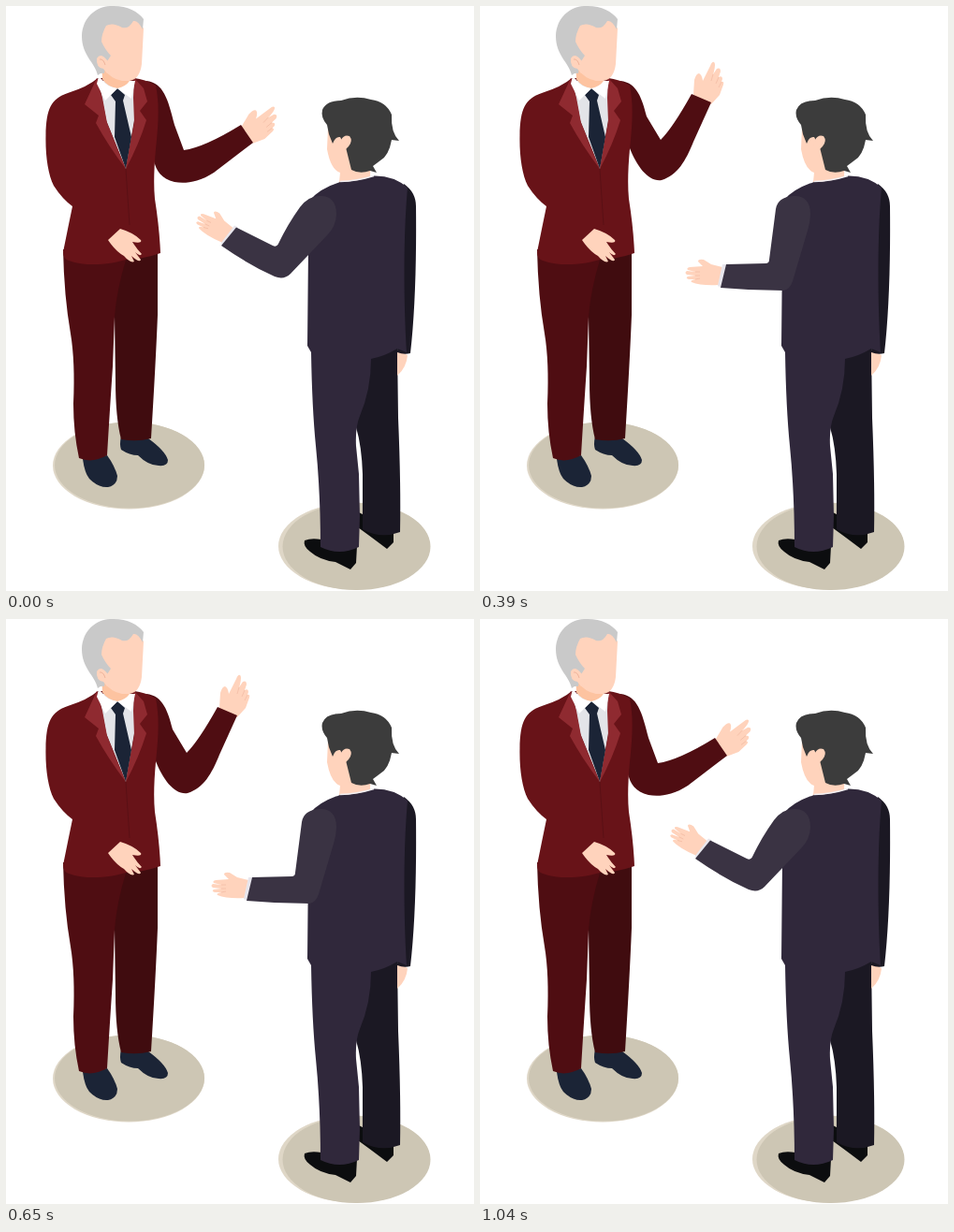
Recreate the animation shown at these times as an HTML page. Size 500x625 px, loop 1170 ms.

```html
<!DOCTYPE html>
<html lang="en">
<head>
<meta charset="utf-8">
<title>Conversation</title>
<style>
  html, body { margin: 0; width: 100%; height: 100%; overflow: hidden; background: #fff; }
  svg { display: block; width: 100%; height: 100%; }
  .skin { fill: #ffd3bc; }
  .crease { fill: none; stroke: #f3bda6; stroke-width: .8; }
  .navy { fill: #1b2436; }
  .red { fill: #681318; }
  .dark-red { fill: #4f0d12; }
  .lapel { fill: #8f2a30; }
  .suit { fill: #30283b; }
  .shade { fill: #1b1823; }
  .black { fill: #0c0d0f; }
</style>
</head>
<body>
<svg viewBox="0 0 500 625">
  <!-- floor discs -->
  <ellipse cx="131" cy="491" rx="81" ry="46.5" fill="#dfd7c7"/>
  <ellipse cx="132" cy="490.5" rx="80" ry="46" fill="#cdc6b4"/>
  <ellipse cx="372" cy="577" rx="81" ry="46.5" fill="#dfd7c7"/>
  <ellipse cx="374.5" cy="577.5" rx="79" ry="46.5" fill="#cdc6b4"/>

  <!-- man in red -->
  <g>
    <path class="navy" d="M123 460Q121 468 123 474Q132 480 141 480Q152 491 163 491Q173 492 173 485Q170 475 152 462Z"/>
    <path class="navy" d="M82 484Q84 499 89 505Q99 515 109 514Q119 512 119 502Q116 491 108 480Z"/>
    <path fill="#400c0f" d="M112 268L116 332L117 400Q117 440 123 463Q140 466 155 462Q160 380 162 330V262Z"/>
    <path class="dark-red" d="M61 260Q62 310 69 350Q74 380 72 425Q72 455 78 483Q92 489 108 480Q111 430 114 385L116 332Q118 304 129 268Z"/>
    <g id="redHand">
      <path class="skin" d="M-9 -3L-8 -19Q-6 -26 -3 -26Q0 -25 1 -18L9 -34Q11 -39 13 -38Q15 -37 13 -28L12 -25L16 -31Q20 -33 20 -28L18 -22Q22 -24 22 -20L21 -17Q24 -18 23 -14L19 -3L10 7Z"/>
      <path class="crease" d="M12 -25L10 -18M18 -22L15 -15M21 -17L18 -11"/>
    </g>
    <path id="redSleeve" class="dark-red"/>
    <path class="red" d="M98 77Q88 86 66 93C48 99 43 110 42.500 138C42 160 45 180 51 192Q60 206 71 214Q66 238 61 263Q61 270 67 272C87 279 111 276 128 271Q148 270 165 264Q164 238 159 206Q157 185 160 153C163 125 164 104 160 85Q148 78 137 77Z"/>
    <path d="M128 174L132 234" fill="none" stroke="#5a1015" stroke-width="1"/>
    <path fill="#e3e4e8" d="M99 80L107 122L128 174L137 122L138 80Z"/>
    <path class="navy" d="M119 88L112 95L117 102L116 140L128 174L134 140L125 101L127 95Z"/>
    <path class="lapel" d="M97 77L84 105L99 117L96 125Q109 149 128 174L108 125L103 98Z"/>
    <path class="lapel" d="M137 77L147 88L151 102L143 112L150 122Q142 148 128 174L137 124L136 98Z"/>
    <path class="skin" d="M101 50L103 78Q110 86 119 88Q130 88 132 80Q143 78 145 62L147 24Q136 8 120 10L101 25Z"/>
    <path fill="#fdc3a0" d="M103 66Q112 78 124 80L133 80Q129 87 119 88Q108 86 103 78Z"/>
    <path fill="#fff" d="M99 75L97 83L106 101L119 88Q107 86 103 79ZM132 80Q128 86 119 88L134 99L138 80Z"/>
    <path fill="#c9c9c9" d="M98 74C95 60 81 53 81 32C82 10 99 -1 115 0C130 0 141 6 147 14L146 25Q141 15 136 16Q131 25 124 23Q114 17 107 21Q102 30 102 38Q106 47 112 53Q109 58 107 60L105 72Q101 71 98 74Z"/>
    <path class="skin" d="M108 58Q101 49 97 56Q96 66 104 67L108 72L113 68Z"/>
    <path d="M100 57Q104 56 106 63" fill="none" stroke="#f0b49b"/>
    <path class="skin" d="M109 250L122 238Q136 242 144 250Q146 254 135 252Q140 260 145 265Q143 268 138 263L144 271Q143 275 134 267L137 273Q133 275 126 267Q117 262 109 250Z"/>
  </g>

  <!-- man in blue -->
  <g>
    <path class="black" d="M377 541L376 557L391 568L407 580L414 573L414 560Z"/>
    <path class="black" d="M337 570Q326 568 319 571Q317 577 325 583Q335 592 352 594L368 602L374 595L375 577Z"/>
    <path class="shade" d="M388 370L374 450Q380 470 381 500L381 559Q400 570 421 562Q422 510 419 440L418 362Z"/>
    <path class="skin" d="M418 368L429 373Q428 386 418 395Z"/>
    <path class="shade" d="M425 190Q438 199 438 214Q439 310 432 371Q425 373 418 370L422 200Z"/>
    <path class="skin" d="M344 130L343 153Q347 175 357 178L356 188Q375 190 389 184L390 150L365 120Z"/>
    <path class="suit" d="M357 188Q375 188 393 181.500Q414 181 429 194C424 250 425 320 428 370L418 366Q405 374 390 377Q390 410 378 438Q373 450 374 470L377 500L378 545L377 578Q356 588 336 578Q336 520 331 470Q327 430 326 370L322 363L323 260L324 208Q335 195 357 188Z"/>
    <path d="M357 187.500Q375 187 393 181.500" fill="none" stroke="#f1eff2" stroke-width="1.5"/>
    <path fill="#3c3c3c" d="M349 147L345 137L343 127Q336 119 338 111Q342 101 358 101Q374 95 390 100Q406 102 412 116Q411 135 420 144L412 143Q409 160 400 165L392 171L396 178L389 176Q378 180 369 175L363 151L357 140Q352 139 349 147Z"/>
    <path class="skin" d="M358 143Q361 137 367 139Q371 144 366 150L362 154L356 152Z"/>
    <g id="blueHand">
      <path class="skin" d="M1 -9L-11 -12L-19 -17Q-25 -18 -25 -15L-20 -10L-34 -9Q-38 -8 -36 -6L-28 -4L-37 -5Q-40 -3 -37 -1L-28 0L-36 1Q-39 3 -35 4L-28 4Q-34 5 -32 7Q-22 11 -3 10Z"/>
      <path class="crease" d="M-28 -4L-23 -4M-28 0L-23 0M-28 4L-23 3"/>
      <path fill="#e8e6ed" d="M1 -12H5L0 13L-4 11Z"/>
    </g>
    <path id="blueSleeve" fill="#3a3343"/>
  </g>
</svg>
<script>
// Arm poses from lowered to raised; hands are [x, y, degrees].
const redShoulder = "M150 80C168 82 173 99 ";
const blueShoulder = "M353 222C353 208 345 202 335 203";
const poses = [
  {
    redHand: [258, 136, 27],
    redSleeve: "180 127L190 154Q212 151 251 127L264 146L222 178C205 189 190 190 180 188C166 185 160 175 158 165Z",
    blueHand: [238, 245, 25.6],
    blueSleeve: "Q323 203 314 215Q301 233 291 254Q289 258 285 256L246 236.500L230 256Q260 277 287 289Q297 293 304 286L343 245Q353 235 353 222Z"
  },
  {
    redHand: [261, 120, 19],
    redSleeve: "180 122L194 148Q215 142 252 113L268 129L222 170C208 183 196 185 186 184C174 181 165 172 160 150Z",
    blueHand: [243, 259, 18],
    blueSleeve: "Q323 204 316 215L296 256Q294 262 289 261L249 250L237 271Q266 287 296 295Q307 298 313 290L345 245Q353 233 353 222Z"
  },
  {
    redHand: [250, 108, 10],
    redSleeve: "179 120L194 146Q211 137 240 102L259 115L226 157C216 174 206 184 190 185C176 183 166 172 160 151Z",
    blueHand: [250, 273, 10],
    blueSleeve: "Q320 204 316 216L303 264Q302 268 298 268L255 263L246 287Q276 298 309 301Q319 302 323 294L347 243Q353 232 353 222Z"
  },
  {
    redHand: [237, 98, 0],
    redSleeve: "178 118L193 143Q206 130 226 94L247 103L228 145C220 165 211 181 194 186C180 188 168 172 160 152Z",
    blueHand: [258, 288, 0],
    blueSleeve: "Q318 204 316 217L309 271Q309 275 305 275L263 276L257 301Q290 304 324 304Q331 303 334 294L350 240Q353 231 353 222Z"
  },
  {
    redHand: [222, 90, -11],
    redSleeve: "177 116L192 140Q201 125 211 88L233 93L222 143C215 165 209 183 192 186C179 187 168 172 160 153Z",
    blueHand: [270, 302, -9],
    blueSleeve: "Q317 204 316 217L313 278Q313 282 309 283L274 290L269 315Q300 313 333 308Q340 306 342 297L351 239Q353 230 353 222Z"
  }
];
const STEP = 130, CYCLE = 9;
const $ = id => document.getElementById(id);

function place(id, [x, y, turn]) {
  $(id).setAttribute("transform", `translate(${x} ${y}) rotate(${turn})`);
}

let shown;
function draw(now) {
  const step = Math.floor(now / STEP) % CYCLE;
  const level = 4 - Math.abs(step - 4);
  if (level !== shown) {
    shown = level;
    const pose = poses[level];
    place("redHand", pose.redHand);
    place("blueHand", pose.blueHand);
    $("redSleeve").setAttribute("d", redShoulder + pose.redSleeve);
    $("blueSleeve").setAttribute("d", blueShoulder + pose.blueSleeve);
  }
}

const start = performance.now();
function tick() {
  draw(performance.now() - start);
  requestAnimationFrame(tick);
}
tick();
</script>
</body>
</html>
```
